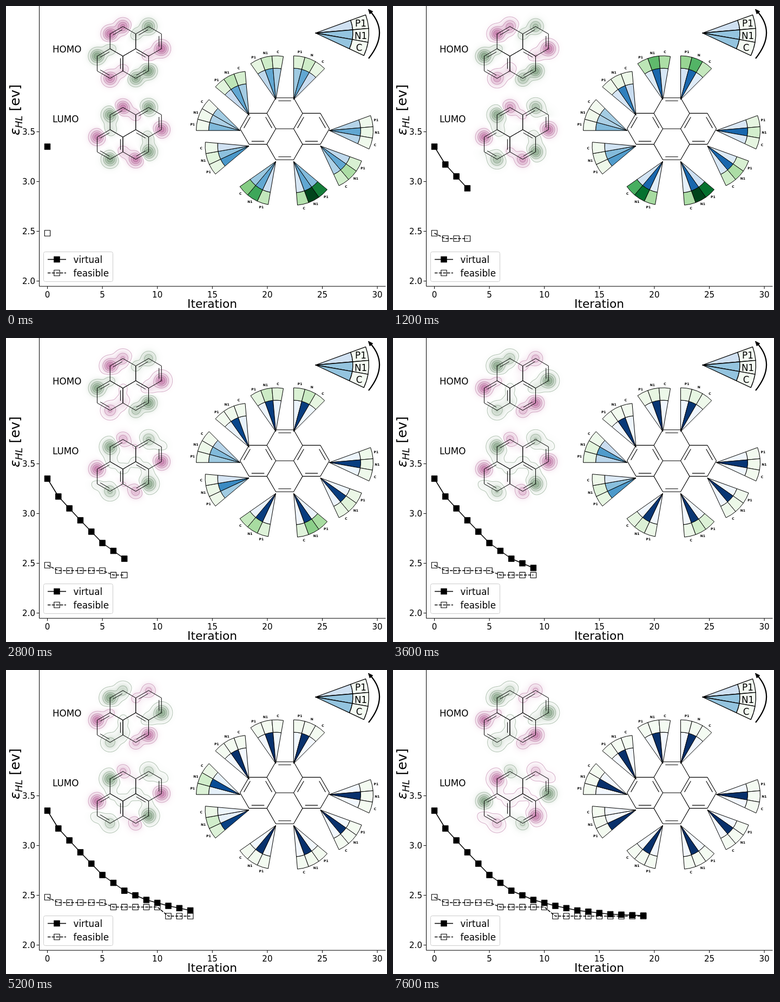
Write an HTML page with a canvas that moves like this. It is 704 by 562 pixels and loops after 8000 ms.

```html
<!DOCTYPE html>
<html lang="en">
<head>
<meta charset="utf-8">
<title>Gap optimisation</title>
<style>
  html, body { margin: 0; width: 100%; height: 100%; overflow: hidden; background: #fff; }
  canvas { position: absolute; left: 140px; top: 10px; }
  svg { position: absolute; left: 0; top: 0; font-family: "DejaVu Sans", sans-serif; }
  .mid { text-anchor: middle; }
  .end { text-anchor: end; }
  .tag { font-weight: bold; text-anchor: middle; }
  .line { fill: none; stroke: #000; stroke-linejoin: round; }
</style>
</head>
<body>
<canvas id="cloud" width="180" height="300"></canvas>
<svg id="stage" width="704" height="562" viewBox="0 0 704 562"></svg>
<script>
const STEP = 400, COUNT = 20;
const stage = document.getElementById('stage');
const ctx = document.getElementById('cloud').getContext('2d');

function add(tag, attrs, text) {
  const el = document.createElementNS('http://www.w3.org/2000/svg', tag);
  for (const k in attrs) el.setAttribute(k, attrs[k]);
  if (text !== undefined) el.textContent = text;
  stage.append(el);
  return el;
}
const path = (d, width, more) => add('path', { d, class: 'line', 'stroke-width': width, ...more });
const label = (x, y, text, size, cls = '') => add('text', { x, y, 'font-size': size, class: cls }, text);
const mix = (a, b, k) => a + (b - a) * k;
const bump = (n, at, width) => Math.exp(-(((n - at) / width) ** 2));
const polar = (x, y, r, deg) => [x + r * Math.cos(deg * Math.PI / 180), y + r * Math.sin(deg * Math.PI / 180)];

// value at n on the broken line through [n, value] points
function along(points, n) {
  let i = 0;
  while (i < points.length - 2 && n > points[i + 1][0]) i++;
  const [a, b] = [points[i], points[i + 1]];
  return mix(a[1], b[1], (n - a[0]) / (b[0] - a[0]));
}

function ramp(hexes) {
  const stops = hexes.split(' ').map(h => [0, 2, 4].map(i => parseInt(h.substr(i, 2), 16)));
  return v => {
    const x = Math.max(0, Math.min(0.9999, v)) * (stops.length - 1), i = Math.floor(x);
    return `rgb(${stops[i].map((c, j) => Math.round(mix(c, stops[i + 1][j], x - i)))})`;
  };
}
const blues = ramp('f7fbff deebf7 c6dbef 9ecae1 6baed6 4292c6 2171b5 08519c 08306b');
const greens = ramp('f7fcf5 e5f5e0 c7e9c0 a1d99b 74c476 41ab5d 238b45 006d2c 00441b');

// ---- axes
const px = i => 76.5 + 20.32 * i;
const py = v => 508.5 - 184 * (v - 2);
path('M61.5 0V518.2H701.5', 1);
for (let i = 0; i <= 30; i += 5) {
  path(`M${px(i)} 518v5`, 1);
  label(px(i), 538.5, i, 15.1, 'mid');
}
for (let v = 2; v < 4; v += 0.5) {
  path(`M61.5 ${py(v)}h-5`, 1);
  label(54, py(v) + 5.5, v.toFixed(1), 15.1, 'end');
}
label(381, 558, 'Iteration', 21.7, 'mid');
const yLabel = add('text', { transform: 'translate(24.5 239) rotate(-90)', 'font-size': 25 });
yLabel.innerHTML = '<tspan font-style="italic">ε</tspan>' +
  '<tspan font-style="italic" font-size="17.5" dy="5">HL</tspan><tspan dy="-5"> [ev]</tspan>';
label(86, 85.7, 'HOMO', 16.8);
label(86, 214.5, 'LUMO', 16.8);

// ---- chart
const VIRTUAL = [[0, 260], [1, 293], [3, 337], [5, 379], [7, 408], [9, 425], [11, 436], [13, 444.5], [16, 451.5], [19, 454]];
const virtualY = i => along(VIRTUAL, i);
const feasibleY = i => i < 1 ? 420 : i < 6 ? 430 : i < 11 ? 438.3 : 455;
const box = (x, y, r = 5.2) => `M${x - r} ${y - r}h${2 * r}v${2 * r}h${-2 * r}z`;
const dashed = { 'stroke-dasharray': '5.4 2.3' };
const solid = { style: 'fill:#000' };
const series = [[virtualY, {}, solid], [feasibleY, dashed, {}]].map(([y, dash, mark]) =>
  ({ y, line: path('', 1.5, dash), marks: path('', 1.1, mark) }));
function drawChart(n) {
  for (const s of series) {
    let line = '', marks = '';
    for (let i = 0; i <= n; i++) {
      line += (i ? 'L' : 'M') + px(i) + ' ' + s.y(i);
      marks += box(px(i), s.y(i));
    }
    s.line.setAttribute('d', line);
    s.marks.setAttribute('d', marks);
  }
}
add('rect', { x: 69.5, y: 454.5, width: 128, height: 55, rx: 3, fill: '#fff', 'fill-opacity': 0.8, stroke: '#ccc' });
[['virtual', {}, solid], ['feasible', dashed, {}]].forEach(([name, dash, mark], i) => {
  const y = 468.5 + 25 * i;
  path(`M77 ${y}h34`, 1.5, dash);
  path(box(94, y), 1.1, mark);
  label(124.5, y + 6, name, 16.8);
});

// ---- four fused rings; corner k of a ring lies at tilt + 60k degrees
function molecule(centers, r, tilt) {
  const atoms = [];
  for (const [x, y] of centers) for (let k = 0; k < 6; k++) {
    const p = polar(x, y, r, tilt + 60 * k);
    if (!atoms.some(a => Math.hypot(a[0] - p[0], a[1] - p[1]) < 4)) atoms.push(p);
  }
  return { centers, r, atoms, corner: (ring, k) => polar(...centers[ring], r, tilt + 60 * k) };
}
// doubles lists, ring by ring, the corners that start a double bond
function skeleton(mol, doubles, width, dy = 0) {
  let d = '';
  mol.centers.forEach((c, ring) => {
    const pt = (k, inset = 0) => mol.corner(ring, k).map((v, i) => mix(v, c[i], inset));
    const join = list => 'M' + list.map(([x, y]) => `${x.toFixed(2)} ${(y + dy).toFixed(2)}`).join('L');
    d += join([0, 1, 2, 3, 4, 5].map(k => pt(k))) + 'z';
    for (const k of doubles[ring]) {
      const a = pt(k, 0.19), b = pt(k + 1, 0.19);
      const trim = t => a.map((v, i) => mix(v, b[i], t));
      d += join([trim(0.06), trim(0.94)]);
    }
  });
  path(d, width);
}
const small = molecule([[216, 65.3], [263.5, 65.3], [192.25, 106.4], [239.75, 106.4]], 27.4, 30);
const LUMO_DY = 149.6;
for (const dy of [0, LUMO_DY]) skeleton(small, [[3], [3, 5], [1, 3, 5], [0, 4]], 1, dy);
const large = molecule([[515, 198.4], [564.5, 227], [515, 255.6], [465.5, 227]], 33, 0);
skeleton(large, [[4], [1, 3, 5], [1], [1, 3, 5]], 1.1);

// ---- wedges
function sector(x, y, r0, r1, from, width) {
  const pt = (r, a) => polar(x, y, r, a).map(v => v.toFixed(2)).join(' ');
  const to = from + 15;
  const inner = r0 ? `L${pt(r0, to)}A${r0} ${r0} 0 0 0 ${pt(r0, from)}` : `L${x} ${y}`;
  return path(`M${pt(r1, from)}A${r1} ${r1} 0 0 1 ${pt(r1, to)}${inner}z`, width);
}
function wedge(x, y, from, r0, r1, width) {
  const row = (a, b) => [0, 1, 2].map(j => sector(x, y, a, b, from + 15 * j, width));
  return { inner: row(0, r0), outer: row(r0, r1) };
}

// at: ring and corner, lean: weight of P1 against C, pull: outer strength at 0 and 3,
// pace: steps until the winner takes over
const sites = [
  { at: [1, 0], angle: -20, lean: .55, pull: [.06, .18] },
  { at: [1, 1], angle: 20, lean: .5, pull: [.32, .32] },
  { at: [2, 1], angle: 40, lean: .8, pull: [.98, 1.05] },
  { at: [2, 2], angle: 100, lean: .4, pull: [.62, .84] },
  { at: [3, 2], angle: 140, lean: .75, pull: [.12, .06], pace: 11, start: [.6, .42, .2], win: 0 },
  { at: [3, 3], angle: 180, lean: .75, pull: [.03, .03], pace: 11, start: [.45, .33, .36] },
  { at: [3, 4], angle: 220, lean: .45, pull: [.26, .08], pace: 5 },
  { at: [0, 4], angle: 235, lean: .5, pull: [.2, .53] },
  { at: [0, 5], angle: 270, lean: .68, pull: [.2, .56] }
];
const NAMES = ['P1', 'N1', 'C'];
for (const s of sites) {
  const [x, y] = large.corner(...s.at);
  const top = y + 3.2;
  s.shape = wedge(x, top, s.angle, 58, 81, 1);
  s.win ??= 1;
  s.pace ??= 3.6;
  s.start ??= [.55 * s.lean, .53, .55 * (1.1 - s.lean)];
  NAMES.forEach((t, j) => {
    const [tx, ty] = polar(x, top, 88.5, s.angle + 7.5 + 15 * j);
    label(tx, ty + 2.2, s.angle === 270 && j === 1 ? 'N' : t, 6, 'tag');
  });
}

function innerShades(s, n) {
  const left = Math.exp(-((n / s.pace) ** (s.pace / 3)));
  const shades = s.start.map((v, j) => j === s.win ? 1 - (1 - v) * left : 0.02 + (v - 0.02) * left);
  if (s.win === 0) {
    const swap = 0.3 * bump(n, 7, 2.5);
    shades[0] -= swap;
    shades[1] += swap;
  }
  return shades;
}
function outerShades(s, n) {
  const fade = n <= 3 ? 1 : Math.exp(-(((n - 3) / 4.2) ** 1.6));
  let pull = mix(...s.pull, Math.min(1, n / 3)) * fade;
  if (s.pace > 10) pull += 0.2 * bump(n, 12, 4);
  return [s.lean, 1, 1.1 - s.lean].map(k => 0.02 + pull * k);
}
function tint(shape, inner, outer) {
  for (let j = 0; j < 3; j++) {
    shape.inner[j].style.fill = blues(inner[j]);
    shape.outer[j].style.fill = greens(outer[j]);
  }
}

// key to the wedges
tint(wedge(572, 50, -20, 69, 98.5, 1.3), [.2, .4, .4], [.02, .02, .02]);
NAMES.forEach((t, j) => label(j < 2 ? 655.5 : 652.5, 38 + 22.5 * j, t, 16.8, 'mid'));
path('M670 97Q708 50 674 11', 2.2);
path('M669.5 6l8.2 4.2l-5.4 4.6z', 1, solid);

// ---- orbitals: groups of atoms of equal weight, with weight at the start and at the end
const homo = [
  { up: [3, 6], down: [13, 14], size: [.82, .76] },
  { up: [4, 11], down: [8, 15], size: [.7, .33] },
  { up: [7, 10], down: [2, 5], size: [.28, .19] },
  { up: [1], down: [0], size: [0, .1] }
];
const lumo = [
  { up: [3, 14], down: [6, 13], size: [.76, .77] },
  { up: [8, 11], down: [4, 15], size: [.76, .33] },
  { up: [2, 7], down: [5, 10], size: [.27, .08] },
  { up: [0, 1, 9, 12], down: [], size: [0, .13] }
];
const PINK = [160, 36, 116], GREEN = [52, 104, 54];
const SPREAD = 72, GAP = 0.18;

function paint(img, groups, n, top, dy, flip) {
  const k = 1 - Math.exp(-n / 5.5);
  const lobes = groups.flatMap(g => {
    const size = mix(...g.size, k);
    const lobe = sign => i => [small.atoms[i][0] - 140.5, small.atoms[i][1] + dy - 10.5, sign * size];
    return [...g.up.map(lobe(1)), ...g.down.map(lobe(-1))];
  });
  const low = 0.04 + 0.06 * Math.exp(-n / 2.5);
  for (let y = top; y < top + 150; y++) for (let x = 0; x < 180; x++) {
    let v = 0, gx = 0, gy = 0;
    for (const [lx, ly, size] of lobes) {
      const dx = x - lx, ey = y - ly;
      const e = size * Math.exp(-(dx * dx + ey * ey) / (2 * SPREAD));
      v += e;
      gx += e * dx / SPREAD;
      gy += e * ey / SPREAD;
    }
    const size = Math.abs(v), over = size - (v > 0 ? low : 0.12);
    const off = Math.abs(over - Math.max(0, Math.round(over / GAP)) * GAP) / (Math.hypot(gx, gy) + 1e-6);
    const edge = size > 0.02 ? Math.max(0, 1 - off) * 0.36 : 0;
    const grain = 0.9 + 0.12 * Math.cos(x * 2.1) * Math.cos(y * 2.1);
    const fill = Math.min(0.8, size * 0.8) * grain;
    const tone = (v > 0) !== flip ? PINK : GREEN;
    const p = (y * 180 + x) * 4;
    tone.forEach((c, i) => { img.data[p + i] = mix(c, 60, 0.6 * edge); });
    img.data[p + 3] = 255 * (fill + edge * (1 - fill));
  }
}
// the sign of an orbital is arbitrary and jumps between steps
function drawClouds(n) {
  const img = ctx.createImageData(180, 300);
  paint(img, homo, n, 0, 0, n > 8);
  paint(img, lumo, n, 150, LUMO_DY, n % 14 !== 5);
  ctx.putImageData(img, 0, 0);
}

let shown = -1;
function frame() {
  const n = Math.floor(performance.now() / STEP) % COUNT;
  if (n !== shown) {
    shown = n;
    drawChart(n);
    for (const s of sites) tint(s.shape, innerShades(s, n), outerShades(s, n));
    drawClouds(n);
  }
  requestAnimationFrame(frame);
}
frame();
</script>
</body>
</html>
```
